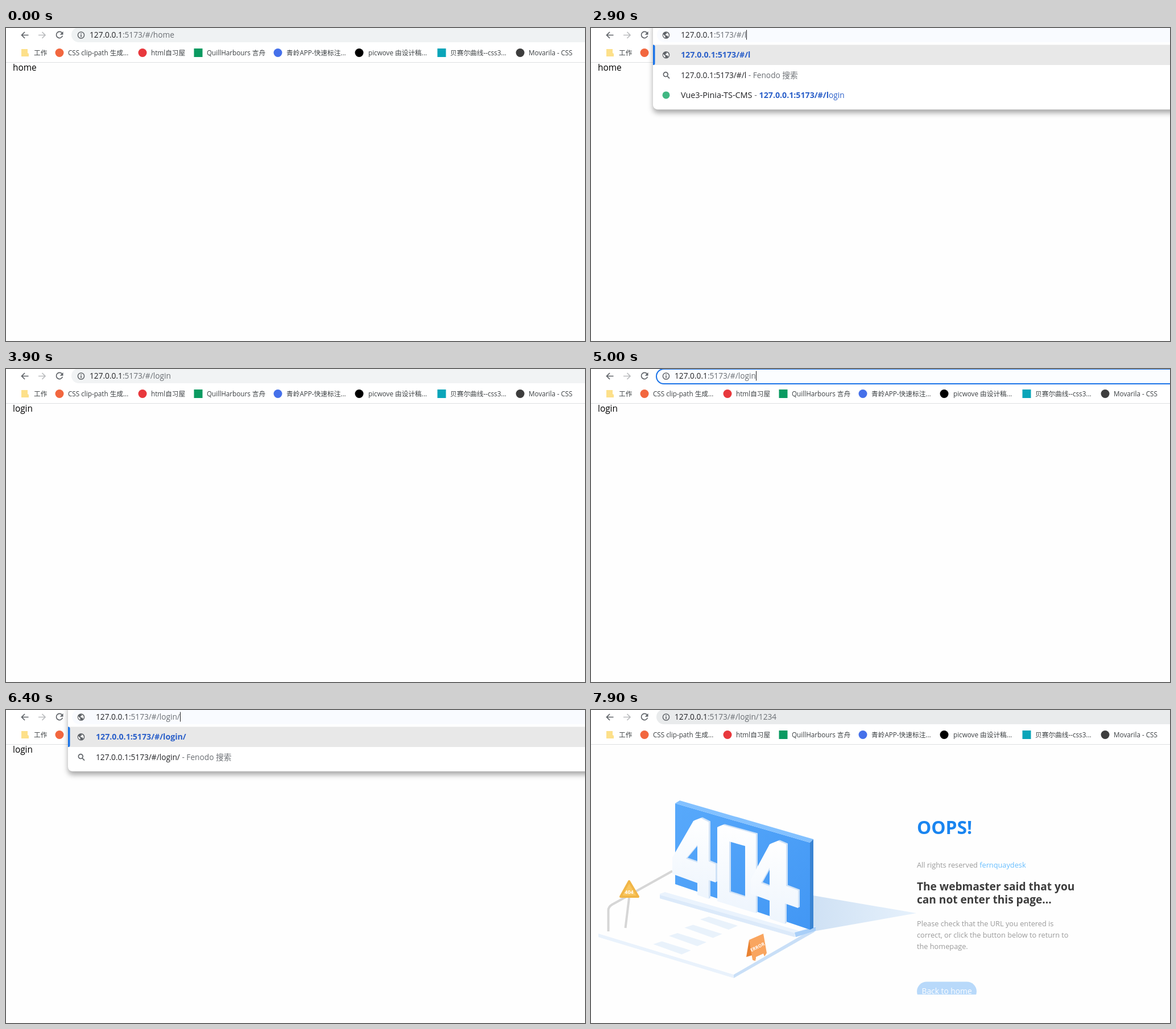
An HTML page for the animation above (8 s loop, 1018x550 px).

```html
<!DOCTYPE html>
<html lang="zh">
<head>
<meta charset="utf-8">
<title>Hash routes</title>
<style>
html, body { margin: 0; width: 100%; height: 100%; overflow: hidden; background: #fff; }
svg { display: block; width: 100%; height: 100%; }
text { font: 13.7px "Open Sans", "Noto Sans CJK SC", "Noto Sans CJK", sans-serif; white-space: pre; fill: #202124; }
.mark text { font-size: 11.7px; fill: #3c4043; }
.grey { fill: #6a6e73; }
.blue { fill: #2a5fc9; }
.bold { font-weight: 700; }
tspan.bold { font-size: 14.2px; }
.title { font-size: 14.4px; }
#page { font-size: 15.4px; fill: #000; }
#menu { filter: drop-shadow(0 6px 5px rgba(0, 0, 0, .34)); }
.icon { fill: none; stroke: #5f6368; stroke-width: 1.7; }
#lost .oops { font-size: 31.8px; font-weight: 700; fill: #1482f0; }
#lost .head { font-size: 19.1px; font-weight: 700; fill: #222; }
#lost .info { font-size: 12.75px; fill: #6c6c6c; }
#lost .back { font-size: 13.8px; fill: #fff; }
#lost .sign { font-weight: 700; fill: #fff; text-anchor: middle; }
</style>
</head>
<body>
<svg viewBox="0 0 1018 550" preserveAspectRatio="none">
  <defs>
    <linearGradient id="wall" x2="1" y2="1">
      <stop stop-color="#58a9fb"/><stop offset="1" stop-color="#4297f4"/>
    </linearGradient>
    <linearGradient id="beam">
      <stop stop-color="#cfe1f4"/><stop offset="1" stop-color="#e6f1fc"/>
    </linearGradient>
    <linearGradient id="digit" x2="0" y2="1">
      <stop stop-color="#fff"/><stop offset="1" stop-color="#eef5fd"/>
    </linearGradient>
    <clipPath id="column"><rect x="573" y="150" width="290" height="350"/></clipPath>
    <path id="four" fill-rule="evenodd" d="M180 195L193 190 207 197V266L219 271V303L207 299V332L187 325V304L143 288V259ZM187 237L167 261 187 268Z"/>
    <path id="zero" fill-rule="evenodd" d="M222 206L232 202 290 218V357L222 336ZM243 231V320L271 329V239Z"/>
    <path id="last" fill-rule="evenodd" d="M314 236L329 230 343 236V309L364 317V348L341 340V376L314 367V335L281 323V297ZM314 277L299 304 314 310Z"/>
    <g id="globe">
      <circle r="6.3" fill="#5f6368"/>
      <path d="M-4.9 -1.5L-1.5 2V4.7A5 5 0 0 1 -4.9 -1.5M0 -4.8L1.8 -3 -1 -1.5 -.5 .5 2.5 1 3.5 3.3A4.8 4.8 0 0 0 3 -3.6Z" fill="#fff"/>
    </g>
    <g id="info">
      <circle r="5.6" class="icon" style="stroke-width:1.5"/>
      <path d="M0 -.8V3.2M0 -3.2V-1.7" class="icon"/>
    </g>
    <path id="glass" class="icon" d="M2.6 2.6L6 6M3.2 -1A3.9 3.9 0 1 1 -4.6 -1A3.9 3.9 0 1 1 3.2 -1"/>
  </defs>
  <rect width="1018" height="550" fill="#fefefe"/>
  <rect width="1018" height="60" fill="#fff"/>
  <path d="M0 60.5H1018" stroke="#dedfe1"/>
  <path class="icon" d="M39.5 12.5H27.5M33 7L27.5 12.5 33 18"/>
  <path class="icon" style="stroke:#babcbe" d="M57 12.5H69M63.5 7L69 12.5 63.5 18"/>
  <path class="icon" d="M98.6 8.6A5.6 5.6 0 1 0 99.4 13.8"/>
  <path d="M100.5 6V11.8H94.7Z" fill="#5f6368"/>
  <rect id="tint" x="325" y="31" width="136" height="26" rx="13" fill="#f8f9fb"/>
  <g id="marks" class="mark"></g>
  <text id="page" x="12" y="75.3"></text>

  <g id="lost">
    <path d="M391 326L572 357 391 389Z" fill="url(#beam)"/>
    <path d="M143 283L37 342Q30.5 346 30.5 352V389M67 330L60.5 383" fill="none" stroke="#d6d6d6" stroke-width="4"/>
    <path d="M13 393L251 465V471L13 399Z" fill="#e9f2fc"/>
    <path d="M251 465L393 383V390L251 471Z" fill="#c9dff7"/>
    <g id="bars" fill="#e9f2fb"></g>
    <path d="M121 323L130 320 366 388 395 380V388L360 399 121 331Z" fill="#eaf3fd"/>
    <path d="M121 325L358 392V399L121 331Z" fill="#dceafa"/>
    <path d="M358 391L395 381V388L360 399Z" fill="#a9cff8"/>
    <path d="M148 164L385 233V386L148 306Z" fill="url(#wall)"/>
    <path d="M148 164L156 159 391 227 385 233Z" fill="#83c1ff"/>
    <path d="M385 233L391 227V383L385 386Z" fill="#3a84d3"/>
    <g id="digits"></g>
    <path d="M67 301L83 328H52Z" fill="#f9c65f" stroke="#f1b647" stroke-width="4" stroke-linejoin="round"/>
    <text class="sign" x="67" y="323" style="font-size:9px">404</text>
    <path d="M278 404L273 434 283 431 285 440 290 437Z" fill="#e98232"/>
    <path d="M278 404L303 393 309 427 305 433 303 428 290 434 289 441 284 439Z" fill="#f9a55f"/>
    <text class="sign" transform="translate(294 419) rotate(-27)" style="font-size:8px">ERROR</text>
    <g clip-path="url(#column)">
      <text class="oops" data-delay="0" x="573" y="217">OOPS!</text>
      <text class="info" data-delay="200" x="573" y="258.5">All rights reserved <tspan fill="#20a0ff">fernquaydesk</tspan></text>
      <text class="head" data-delay="100" x="573" y="310.3">The webmaster said that you<tspan x="573" dy="23">can not enter this page...</tspan></text>
      <text class="info" data-delay="200" x="573" y="361.8">Please check that the URL you entered is<tspan x="573" dy="20">correct, or click the button below to return to</tspan><tspan x="573" dy="20">the homepage.</tspan></text>
      <g data-delay="300">
        <rect x="573" y="437" width="105" height="34.4" rx="17.2" fill="#1482f0"/>
        <text class="back" x="581.5" y="459">Back to home</text>
      </g>
    </g>
  </g>

  <g id="menu">
    <rect id="sheet" x="109" y="-12" width="930" rx="8" fill="#fff"/>
    <path d="M109 29.5H1018V65H109Z" fill="#e8e8e8"/>
    <path d="M109 29.5H110Q112.5 30 112.5 32V62Q112.5 65 110 65H109Z" fill="#1a73e8"/>
    <g id="rows"></g>
  </g>
  <rect id="bar" x="115" height="26" width="930" rx="13"/>
  <use id="barIcon" x="132" y="12.5"/>
  <rect id="sel" y="3" height="19" fill="#9bc3f6"/>
  <text id="url" y="17.3"></text>
  <rect id="caret" y="3.5" width="1" height="17" fill="#202124"/>
</svg>
<script>
const $ = id => document.getElementById(id);
const LOOP = 8000, LOST_AT = 7600, SLIDE_FROM = 7500, STEP = 100;
const HOST = '127.0.0.1', BASE = ':5173/#/', SITE = HOST + BASE;

// [icon x, shape, colour, text x, label]
const bookmarks = [
  [33, 'folder', '#fde08a', 49, '工作'],
  [94, 'circle', '#f2673f', 109, 'CSS clip-path 生成...'],
  [240, 'circle', '#e8383d', 255, 'html自习屋'],
  [338, 'square', '#0a9a61', 353, 'QuillHarbours 言舟'],
  [478, 'circle', '#4570ea', 493, '青岭APP-快速标注...'],
  [621, 'circle', '#000', 637, 'picwove 由设计稿...'],
  [766, 'square', '#0aa5b9', 781, '贝赛尔曲线--css3...'],
  [904, 'circle', '#3d3d3d', 919, 'Movarila - CSS']
];
const shapes = {
  folder: (x, c) => `<path d="M${x - 6} 37H${x + 5}V44L${x + 7} 45V50H${x - 6}Z" fill="${c}"/>`,
  circle: (x, c) => `<circle cx="${x}" cy="43.5" r="7.5" fill="${c}"/>`,
  square: (x, c) => `<rect x="${x - 7.5}" y="36" width="15" height="15" fill="${c}"/>`
};
$('marks').innerHTML = bookmarks.map(([x, shape, color, tx, label]) =>
  `${shapes[shape](x, color)}<text x="${tx}" y="48">${label}</text>`).join('');

$('bars').innerHTML = [0, 1, 2, 3].map(i =>
  `<path d="M192 368L207 363 258 379 242 386Z" transform="translate(${-27.5 * i} ${14.5 * i})"/>`).join('');
const solid = shape => [3, 2, 1].map(d =>
  `<use href="#${shape}" x="${d}" y="${-d / 2}" fill="#cfe2f7"/>`).join('') +
  `<use href="#${shape}" fill="url(#digit)"/>`;
$('digits').innerHTML = ['four', 'zero', 'last'].map(solid).join('');

const slides = [...document.querySelectorAll('[data-delay]')].map(el => {
  const anim = el.animate(
    [{ opacity: 0, transform: 'translateY(57.3px)' }, { opacity: 1, transform: 'translateY(0)' }],
    { duration: 500, delay: +el.dataset.delay, easing: 'ease', fill: 'both' });
  anim.pause();
  return anim;
});

// sel: selection start within the address; menu: path shown in the suggestions
const typed = path => ({ mode: 'typing', path, menu: path, caret: true });
const steps = [
  [0, { mode: 'soft', path: 'home', page: 'home' }],
  [500, { mode: 'soft', path: 'home', tint: true }],
  [600, { mode: 'hover', path: 'home', tint: true }],
  [1600, { mode: 'focus', path: 'home', caret: true, tint: true }],
  [1700, { mode: 'focus', path: 'home', sel: SITE.length, tint: true }],
  [2900, typed('l')],
  [3100, typed('lo')],
  [3200, typed('log')],
  [3400, typed('logi')],
  [3500, typed('login')],
  [3800, { mode: 'idle', path: 'login', menu: 'login' }],
  [3900, { mode: 'idle', path: 'login', page: 'login' }],
  [5000, { mode: 'focus', path: 'login', caret: true }],
  [5100, { mode: 'focus', path: 'login', sel: 0 }],
  [5800, { mode: 'focus', path: 'login', caret: true }],
  [6300, { mode: 'focus', path: 'login/', caret: true }],
  [6400, typed('login/')],
  [6700, typed('login/1')],
  [6900, typed('login/12')],
  [7000, typed('login/123')],
  [7200, typed('login/1234')],
  [7500, { mode: 'idle', path: 'login/1234', menu: 'login/1234' }],
  [LOST_AT, { mode: 'hover', path: 'login/1234', page: '' }]
];
const fills = { soft: '#eff2f3', idle: '#f1f3f4', hover: '#e9ebec', focus: '#fbfdff', typing: '#f9fbff' };

const show = (id, on) => { $(id).style.display = on ? '' : 'none'; };
const set = (id, attrs) => { for (const k in attrs) $(id).setAttribute(k, attrs[k]); };
const strong = s => `<tspan class="blue bold">${s}</tspan>`;
const title = '<tspan class="title">Vue3-Pinia-TS-CMS<tspan class="grey"> - </tspan></tspan>';
const dot = '<circle cx="132" r="6.5" fill="#41b883"/>';
const symbol = id => `<use href="#${id}" x="132"/>`;

function suggestions(path) {
  const full = SITE + path, visited = path === 'login';
  const rows = [
    visited ? [dot, title + strong(full)] : [symbol('globe'), strong(full)],
    [symbol('glass'), `${full}<tspan class="grey"> - Fenodo 搜索</tspan>`]
  ];
  if (path.length < 5)
    rows.push([dot, `${title}${strong(full)}<tspan class="blue">${'login'.slice(path.length)}</tspan>`]);
  return rows;
}

function drawMenu(path) {
  const rows = suggestions(path);
  set('sheet', { height: 49 + 35.4 * rows.length });
  $('rows').innerHTML = rows.map(([icon, label], i) =>
    `<g transform="translate(0 ${47.3 + 35.3 * i})">${icon}<text x="158" y="5">${label}</text></g>`).join('');
}

function draw(s) {
  const typing = s.mode === 'typing', focus = s.mode === 'focus';
  const selected = s.sel !== undefined, x = typing ? 158 : 147;
  set('bar', { x: s.menu ? 116 : 115, y: focus ? 0 : -1, fill: fills[s.mode],
    stroke: focus ? '#1a73e8' : 'none', 'stroke-width': 2 });
  set('barIcon', { href: typing ? '#globe' : '#info' });
  const url = $('url');
  set('url', { x });
  url.innerHTML = `${HOST}<tspan class="grey">${BASE}</tspan>` +
    `<tspan class="${selected ? '' : 'grey'}">${s.path}</tspan>`;
  const width = url.getComputedTextLength();
  show('caret', s.caret);
  set('caret', { x: Math.round(x + width) });
  show('sel', selected);
  if (selected) {
    const start = s.sel ? url.getSubStringLength(0, s.sel) : 0;
    set('sel', { x: x + start, width: width - start });
  }
  show('menu', s.menu);
  if (s.menu) drawMenu(s.menu);
  show('tint', s.tint);
}

let current = -1;
function render(t) {
  const i = steps.findLastIndex(([at]) => at <= t);
  if (i !== current) {
    current = i;
    draw(steps[i][1]);
    $('page').textContent = steps.slice(0, i + 1).findLast(([, s]) => s.page !== undefined)[1].page;
    show('lost', t >= LOST_AT);
  }
  const elapsed = Math.max(0, Math.floor(t / STEP) * STEP - SLIDE_FROM);
  slides.forEach(anim => { anim.currentTime = elapsed; });
}

const begin = performance.now();
function tick() {
  render((performance.now() - begin) % LOOP);
  requestAnimationFrame(tick);
}
tick();
</script>
</body>
</html>
```
